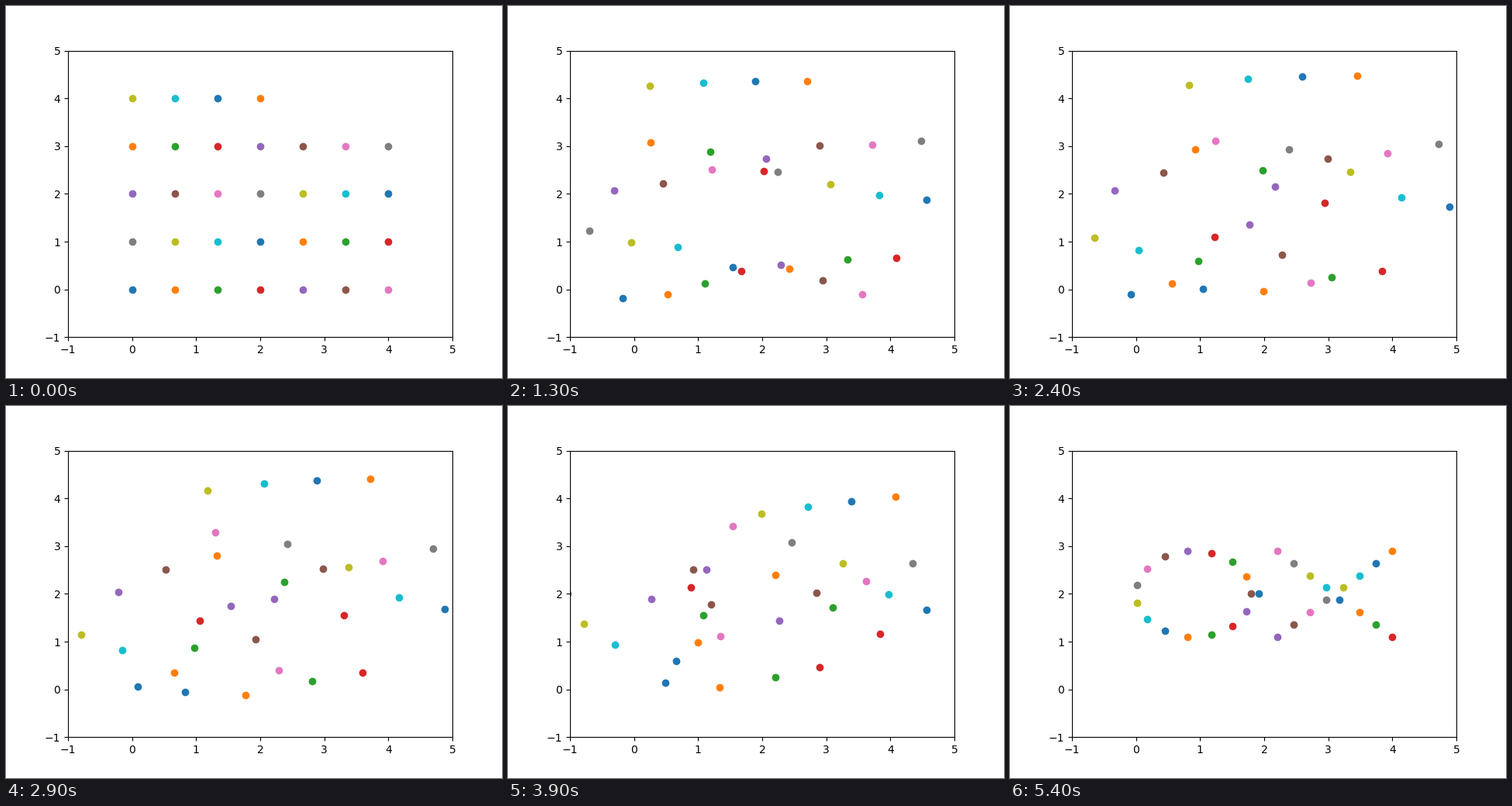
A matplotlib script that plays this animation: 640 by 480 pixels, repeating every 7500 ms.

```python
import numpy as np
import matplotlib.pyplot as plt
from matplotlib.animation import FuncAnimation

FRAMES, INTERVAL = 150, 50
HOLD, STEPS = 9, 99
COUNT = 32


def grid():
    k = np.arange(COUNT)
    return np.column_stack([k % 7 * 4 / 6, k // 7])


def letters():
    """An O of 16 dots and an X of two 8-dot strokes."""
    a = np.linspace(0, 2 * np.pi, 16)
    ring = np.column_stack([0.9 + 0.9 * np.cos(a), 2 + 0.9 * np.sin(a)])
    x = np.linspace(2.2, 4, 8)
    y = np.linspace(1.1, 2.9, 8)
    down = np.column_stack([x, y[::-1]])
    up = np.column_stack([x, y])
    pts = np.vstack([ring, down, up])
    # keep crowded dots apart
    pts[0, 0] += 0.12
    pts[20, 0] -= 0.06
    return pts


def pull(pos, soft):
    """Planar gravity (1/r) on every dot, at every time step."""
    gap = pos[:, None, :, :] - pos[:, :, None, :]
    dist2 = (gap ** 2).sum(-1, keepdims=True) + soft
    return (gap / dist2).sum(2)


def solve_paths(start, end, rounds=500, rate=0.2):
    """Orbits from start to end in unit time, by damped relaxation.

    Softening shrinks as the paths settle, so that dots first spread
    out as a swarm and then find their way past each other.
    """
    t = np.linspace(0, 1, STEPS + 1)[:, None, None]
    line = start + (end - start) * t
    n = STEPS - 1
    second_diff = (np.eye(n, k=1) - 2 * np.eye(n) + np.eye(n, k=-1)) * STEPS ** 2
    integrate = np.linalg.inv(second_diff)
    paths = line.copy()
    for k in range(rounds):
        soft = max(10 ** (-k / 100), 1e-3)
        bend = np.tensordot(integrate, pull(paths[1:-1], soft), 1)
        paths[1:-1] += rate * (line[1:-1] + bend - paths[1:-1])
    return paths


paths = solve_paths(grid(), letters())

fig, ax = plt.subplots(figsize=(6.4, 4.8), dpi=100)
ax.set_xlim(-1, 5)
ax.set_ylim(-1, 5)
dots = [ax.plot([x], [y], "o")[0] for x, y in paths[0]]


def update(frame):
    step = min(max(frame - HOLD, 0), STEPS)
    for dot, (x, y) in zip(dots, paths[step]):
        dot.set_data([x], [y])
    return dots


anim = FuncAnimation(fig, update, frames=FRAMES, interval=INTERVAL,
                     repeat=True, repeat_delay=0)
plt.show()
```
